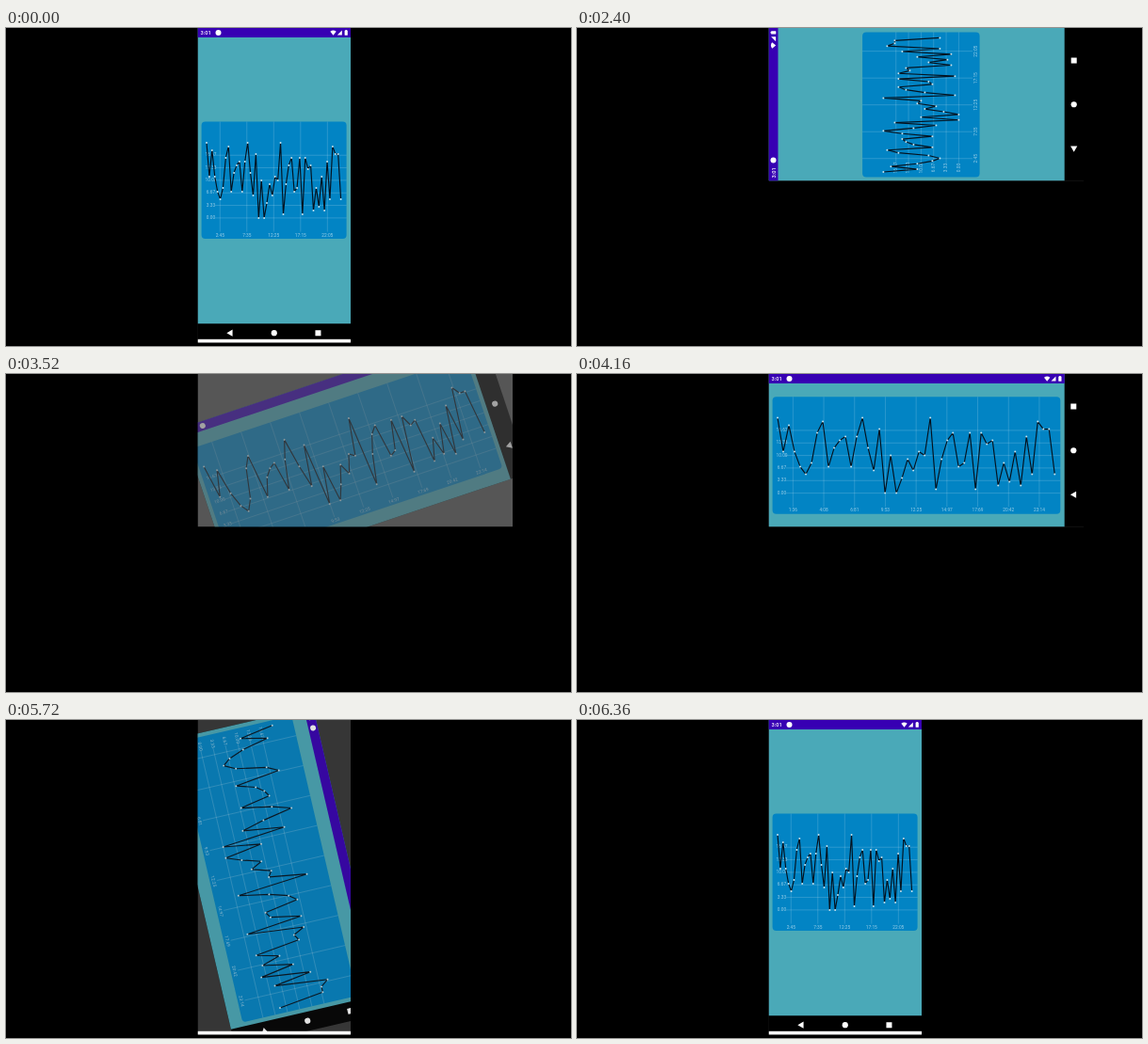
Write an HTML page that moves like this. It is 600 px wide and 338 px high and loops after 6400 ms.

```html
<!DOCTYPE html>
<html lang="en">
<head>
<meta charset="utf-8">
<title>Chart on a rotating phone</title>
<style>
html, body { margin: 0; width: 100%; height: 100%; overflow: hidden; background: #000; }
svg { display: block; }
text { font-family: Roboto, Arial, sans-serif; }
.label { font-size: 4.8px; fill: #fff; fill-opacity: .6; text-anchor: middle; }
.grid { stroke: #fff; stroke-opacity: .24; stroke-width: .7; fill: none; }
.line { stroke: #04121f; stroke-width: 1.15; fill: none; stroke-linejoin: round; }
.dot { fill: #c4e6f4; }
</style>
</head>
<body>
<svg width="600" height="338" viewBox="0 0 600 338">
  <rect width="600" height="338"/>
  <svg id="view" x="203.5" y="0" overflow="hidden">
    <rect id="back" width="100%" height="100%"/>
    <g id="portrait"></g>
    <g id="landscape"></g>
    <rect id="strip" y="330.8" width="163" height="4" fill="#fff"/>
  </svg>
</svg>
<script>
const SHORT = 162.5, LONG = 334.5, NAV = 20.3, LOOP = 6400, SPIN = 450;
const values = [
  20, 11, 18, 11, 7, 5, 8, 16, 19, 7, 12, 14, 15, 7, 15, 20, 12, 6, 17, 0, 10, 0, 4, 9, 6,
  11, 10, 20, 1, 9, 14, 16, 7, 8, 16, 1, 16, 13, 14, 2, 8, 3, 11, 2, 15, 5, 19, 17, 17, 5
];
const $ = id => document.getElementById(id);
const clamp = x => Math.min(1, Math.max(0, x));
const rect = (x, y, w, h, fill, r = 0) =>
  `<rect x="${x}" y="${y}" width="${w}" height="${h}" rx="${r}" fill="${fill}"/>`;
const circle = (x, y, r, attrs) => `<circle cx="${x}" cy="${y}" r="${r}" ${attrs}/>`;
const path = (d, attrs) => `<path d="${d}" ${attrs}/>`;
const label = (x, y, s) => `<text class="label" x="${x}" y="${y + 1.7}">${s}</text>`;

function statusBar(w) {
  const white = 'fill="#fff"';
  return rect(0, 0, w, 10, '#3700b3') +
    `<text x="3" y="7.2" font-size="5.7" font-weight="500" fill="#fff">3:01</text>` +
    circle(22, 5, 3, white) +
    path(`M${w - 21.7} 3.7q3.2-2.6 6.4 0l-3.2 4z`, white) +
    path(`M${w - 14.2} 7.6h5v-5z`, white) +
    rect(w - 6.4, 2.6, 3.2, 5.2, '#fff', .5) +
    rect(w - 5.5, 2, 1.4, 1, '#fff');
}

function chart(w, top, columns) {
  const left = 9.5, step = (w - 19.9) / (values.length - 1);
  const px = i => left + i * step;
  const py = v => top + 102.3 - v * 4;
  let grid = '', labels = '', dots = '';
  for (let i = 0; i < 6; i++) {
    const v = i * 10 / 3;
    grid += `M18.5 ${py(v)}H${w - 4.4}`;
    labels += label(14, py(v) - .6, v.toFixed(2));
  }
  // samples are half an hour apart
  for (let i = 0; i < columns; i++) {
    const hour = 24.5 * (i + .5) / columns;
    grid += `M${px(hour * 2)} ${top}v117`;
    labels += label(px(hour * 2), top + 120.4, hour.toFixed(2).replace('.', ':'));
  }
  values.forEach((v, i) => dots += circle(px(i), py(v), 1, 'class="dot"'));
  const line = 'M' + values.map((v, i) => px(i) + ' ' + py(v)).join('L');
  return rect(4.1, top, w - 8.5, 124.5, '#0284c4', 4) +
    path(grid, 'class="grid"') + labels + path(line, 'class="line"') + dots;
}

const back = (x, y) => path(`M${x - 3.4} ${y}l6.2-3.6v7.2z`, 'fill="#fff"');
const home = (x, y) => circle(x, y, 3.1, 'fill="#fff"');
const recent = (x, y) => rect(x - 3, y - 3, 6, 6, '#fff');

function buildScreens() {
  const midX = SHORT / 2, navY = LONG - 10.3, navX = LONG - 10.7;
  $('portrait').innerHTML =
    rect(0, 0, SHORT, LONG, '#000') + rect(0, 0, SHORT, LONG - NAV, '#4aa9b8') +
    statusBar(SHORT) + chart(SHORT, 99.6, 5) +
    back(midX - 47, navY) + home(midX, navY) + recent(midX + 46.7, navY);
  const wide = LONG - NAV;
  $('landscape').innerHTML =
    rect(0, 0, LONG, SHORT, '#000') + rect(0, 0, wide, SHORT, '#4aa9b8') +
    statusBar(wide) + chart(wide, 24.3, 9) +
    back(navX, midX + 47) + home(navX, midX) + recent(navX, midX - 46.7);
}

// cubic-bezier(.4, 0, .2, 1)
function ease(x) {
  let lo = 0, hi = 1;
  for (let i = 0; i < 20; i++) {
    const s = (lo + hi) / 2, q = 1 - s;
    if (1.2 * s * q * q + .6 * s * s * q + s ** 3 < x) lo = s; else hi = s;
  }
  return lo * lo * (3 - 2 * lo);
}

function place(id, w, h, sw, sh, angle, opacity) {
  const g = $(id);
  g.setAttribute('transform',
    `translate(${w / 2} ${h / 2}) rotate(${angle}) translate(${-sw / 2} ${-sh / 2})`);
  g.setAttribute('opacity', opacity);
}

function draw(t) {
  const wide = t >= 2240 && t < 4760;
  const w = wide ? LONG : SHORT, h = wide ? SHORT : LONG;
  const elapsed = t < 2240 ? SPIN : t - (wide ? 3289 : 5628);
  const angle = (wide ? -90 : 90) * (1 - ease(clamp(elapsed / SPIN)));
  const oldAlpha = 1 - clamp((elapsed - 82) / 76);
  const newAlpha = clamp((elapsed - 160) / 160);
  $('view').setAttribute('width', w);
  $('view').setAttribute('height', h);
  $('back').setAttribute('fill', wide ? '#565656' : '#363636');
  $('strip').setAttribute('opacity', wide ? 0 : 1);
  place('portrait', w, h, SHORT, LONG, angle, wide ? oldAlpha : newAlpha);
  place('landscape', w, h, LONG, SHORT, angle, wide ? newAlpha : oldAlpha);
}

buildScreens();
const start = performance.now();
(function tick() {
  draw((performance.now() - start) % LOOP);
  requestAnimationFrame(tick);
})();
</script>
</body>
</html>
```
